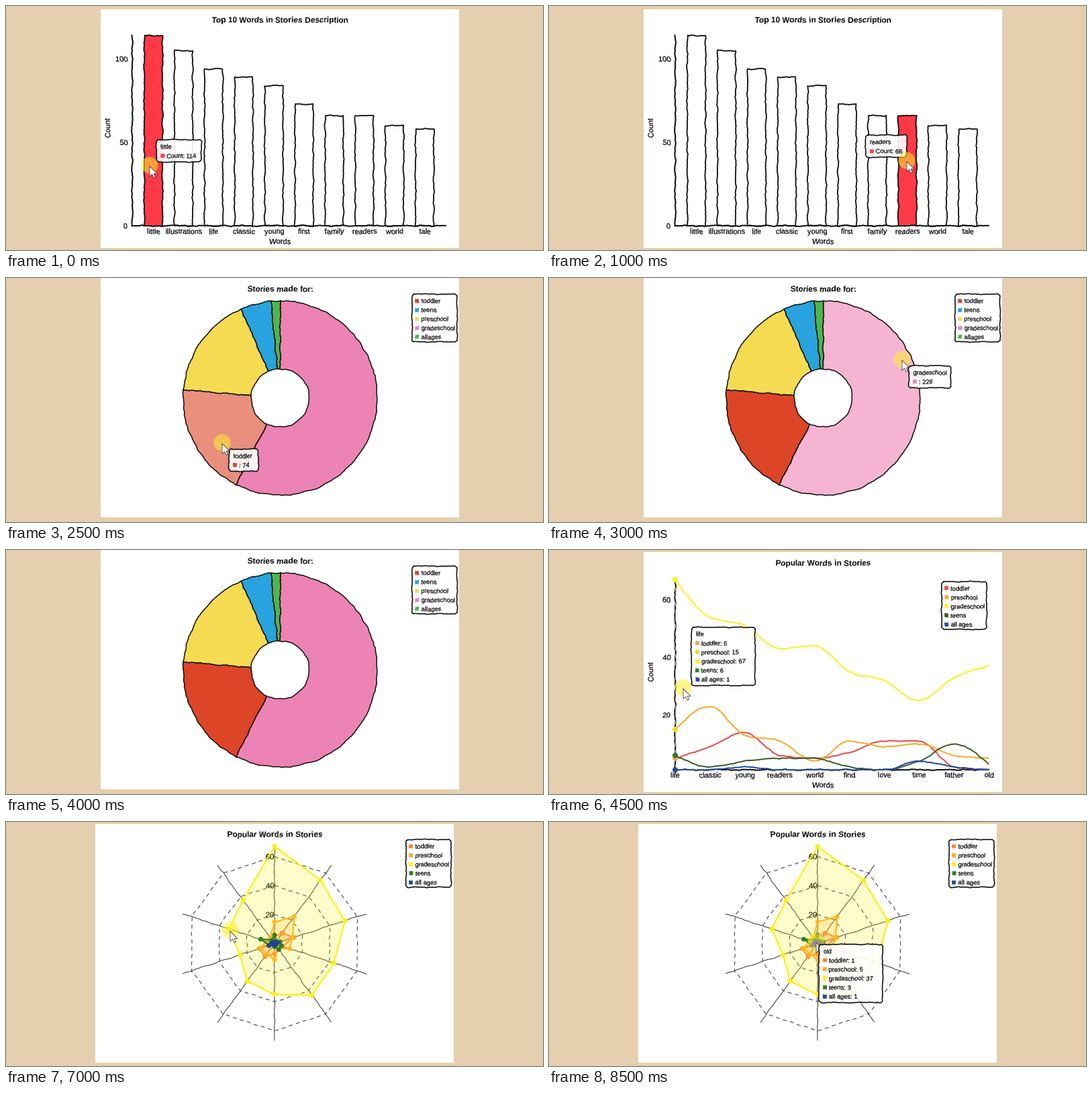
Recreate the animation shown at these times as a matplotlib script. Size 800x363 px, loop 9000 ms.

```python
import numpy as np
import matplotlib.pyplot as plt
from matplotlib.animation import FuncAnimation
from matplotlib.patches import PathPatch
from matplotlib.path import Path
from matplotlib.textpath import TextPath

W, H, DPI = 800, 363, 64
PX = 72 / DPI
INK = "#0c0c0c"
GRID = "#303030"
FONT = "Liberation Sans"

BAR_RED = "#ff3a46"
BARS = dict(little=114, illustrations=105, life=94, classic=89, young=84,
            first=73, family=66, readers=66, world=60, tale=58)

# slices run clockwise from the top
SLICES = [("gradeschool", 226, "#ed83b4"), ("toddler", 74, "#dc4526"),
          ("preschool", 67, "#f4db52"), ("teens", 20, "#29a3dd"),
          ("allages", 6, "#4cb64d")]

WORDS = "life classic young readers world find love time father old".split()
SERIES = {
    "toddler": [5, 9, 14, 6, 5, 7, 11, 11, 2, 1],
    "preschool": [15, 23, 13, 11, 4, 11, 9, 10, 6, 5],
    "gradeschool": [67, 54, 51, 43, 44, 35, 32, 25, 33, 37],
    "teens": [6, 2, 4, 5, 5, 2, 1, 4, 10, 3],
    "all ages": [1, 1, 2, 1, 1, 1, 1, 4, 2, 1],
}
LINE_COLORS = ["#ee4848", "#ffa726", "#fff01a", "#3c5a28", "#2149a8"]
DOT_COLORS = ["#dfab55", "#f2d81e", "#fff01a", "#2f7d22", "#2149a8"]
RADAR_COLORS = ["#ff7c38", "#ffaa22", "#fff000", "#2f7d22", "#1f4690"]

# step: (hovered index or None, pointer position)
HOVER = {
    0: (0, (214, 237)), 1: (3, (358, 232)), 2: (7, (533, 230)), 3: (9, (615, 235)),
    5: (1, (322, 245)), 6: (0, (526, 121)), 7: (3, (376, 70)),
    9: (0, (200, 205)), 10: (3, (336, 205)), 11: (5, (461, 203)), 12: (7, (553, 205)),
    14: (None, (334, 161)), 15: (8, (332, 159)), 16: (1, (428, 141)), 17: (9, (398, 178)),
}

fig = plt.figure(figsize=(W / DPI, H / DPI), dpi=DPI, facecolor="#e6cfae")
ax = fig.add_axes([0, 0, 1, 1])
ax.set_xlim(0, W)
ax.set_ylim(H, 0)
ax.axis("off")


def wave(u, v):
    """Uneven wobble along u that drifts slowly with v."""
    return (0.5 * np.sin(0.17 * u + 1.7 * np.sin(0.05 * v + 0.041 * u))
            + 0.35 * np.sin(0.41 * u + 0.2 * v + 2 * np.sin(0.09 * u))
            + 0.18 * np.sin(0.97 * u - 0.3 * v))


def warp(p, k=1.0):
    p = np.asarray(p, float)
    x, y = p.T
    return p + k * np.column_stack([wave(y, x), wave(x, y + 40)])


def resample(pts, step=1.5):
    pts = np.asarray(pts, float)
    out = [pts[:1]]
    for a, b in zip(pts[:-1], pts[1:]):
        n = max(1, int(np.hypot(*(b - a)) / step))
        out.append(a + (b - a) * np.linspace(0, 1, n + 1)[1:, None])
    return np.vstack(out)


def shape(verts, fill="none", edge="none", lw=0.0, codes=None, dash=None):
    style = (0, tuple(d / lw for d in dash)) if dash else "-"
    ax.add_patch(PathPatch(Path(verts, codes), facecolor=fill, edgecolor=edge,
                           linewidth=lw * PX, linestyle=style, joinstyle="round",
                           capstyle="butt" if dash else "round"))


def rough(pts, fill="none", edge=INK, lw=1.8, closed=False, dash=None, k=1.0):
    pts = list(pts)
    if closed:
        pts.append(pts[0])
    shape(warp(resample(pts), k), fill, edge, lw, dash=dash)


def disc(x, y, r, fill):
    a = np.linspace(0, 2 * np.pi, 40)
    shape(np.column_stack([x + r * np.cos(a), y + r * np.sin(a)]), fill)


def text(s, x, y, size=10.9, ha=0.5, bold=False, turn=False):
    prop = dict(family=FONT, weight="bold" if bold else "normal")
    path = TextPath((0, 0), s, size=size, prop=prop)
    vx, vy = path.vertices.T
    vx = vx - ha * vx.max()
    vy = 0.36 * size - vy
    if turn:
        vx, vy = vy, -vx
    verts = warp(np.column_stack([vx + x, vy + y]), 0.7)
    shape(verts, INK, INK, 0.05 if bold else 0.3, codes=path.codes)


def box(x, y, w, h, fill, r=2.5):
    x2, y2 = x + w, y + h
    rough([(x + r, y), (x2 - r, y), (x2, y + r), (x2, y2 - r), (x2 - r, y2),
           (x + r, y2), (x, y2 - r), (x, y + r)], fill, lw=1.6, closed=True, k=0.8)


def marker(x, y, color):
    r = 2.6
    rough([(x - r, y - r), (x + r, y - r), (x + r, y + r), (x - r, y + r)],
          color, color, 0.6, closed=True, k=0.6)


def legend(x, y, names, colors):
    box(x, y, 67, 71, "white")
    for i, (name, color) in enumerate(zip(names, colors)):
        marker(x + 7.2, y + 10 + 13.4 * i, color)
        text(name, x + 13.6, y + 10 + 13.4 * i, 9.3, ha=0)


def tip_width(title, items):
    longest = max(len(s) for s, _ in items)
    return 11 + max(4.7 * len(title), 5.6 * longest)


def tooltip(x, y, title, items):
    box(x, y, tip_width(title, items), 33 + 13.4 * (len(items) - 1), ("white", 0.9))
    text(title, x + 6.5, y + 10, 9.3, ha=0)
    for i, (s, color) in enumerate(items):
        marker(x + 9, y + 23.7 + 13.4 * i, color)
        text(s, x + 14.8, y + 23.7 + 13.4 * i, 9.3, ha=0)


def glow(x, y):
    disc(x, y, 12.5, ("#ffee30", 0.56))


def pointer(x, y):
    arrow = [(0, 0), (0, 15), (3.6, 11.8), (6.2, 17), (8.6, 16), (6.2, 11), (11, 11), (0, 0)]
    shape(np.array(arrow) + (x, y + 1.5), "white", "#4a4a4a", 0.9)


def page(x, y, h, title, title_y):
    shape([(x, y), (x + 534, y), (x + 534, y + h), (x, y + h), (x, y)], "white")
    text(title, x + 267, title_y, 11.9, bold=True)


def axes(ticks, to_y, label_y):
    rough([(188, 44), (188, 327)], lw=2)
    rough([(188, 327), (655, 327)], lw=2)
    for v in ticks:
        text(str(v), 181, to_y(v), ha=1)
    text("Count", 151, 182, turn=True)
    text("Words", 408, label_y)


def bar_chart(hover, pos):
    page(141, 5, 355, "Top 10 Words in Stories Description", 20.3)

    def to_y(v):
        return 327 - 2.482 * v

    axes((0, 50, 100), to_y, 350)
    for i, (word, count) in enumerate(BARS.items()):
        x, y = 219.6 + 44.9 * i, to_y(count)
        fill = BAR_RED if i == hover else "none"
        rough([(x - 13.6, 327), (x - 13.6, y), (x + 13.6, y), (x + 13.6, 327)], fill, closed=True)
        text(word, x, 335)
    if pos:
        x, y = pos
        word = list(BARS)[hover]
        items = [(f"Count: {BARS[word]}", BAR_RED)]
        left = x + 10 if x < 408 else x - tip_width(word, items)
        tooltip(left, y - 38, word, items)
        glow(x, y)
        pointer(x, y)


def pie_chart(hover, pos):
    page(141, 0, 356, "Stories made for:", 16)
    total = sum(s[1] for s in SLICES)
    start = 0.0
    for i, (_, count, color) in enumerate(SLICES):
        end = start + 2 * np.pi * count / total
        a = np.linspace(start, end, 90)
        ring = np.column_stack([np.sin(a), -np.cos(a)])
        pts = np.vstack([144.5 * ring, 43.2 * ring[::-1]]) + (408.5, 178.5)
        rough(pts, (color, 0.6) if i == hover else color, lw=1.5, closed=True)
        start = end
    by_name = {name: color for name, _, color in SLICES}
    order = ["toddler", "teens", "preschool", "gradeschool", "allages"]
    legend(605, 24, order, [by_name[n] for n in order])
    if pos:
        x, y = pos
        name, count, color = SLICES[hover]
        glow(x, y)
        pointer(x, y)
        tooltip(x + 10, y + 9.5, name, [(f": {count}", color)])


def smooth(x, y):
    """Monotone cubic through evenly spaced points."""
    h = x[1] - x[0]
    s = np.diff(y) / h
    a, b = s[:-1], s[1:]
    low = np.minimum(np.minimum(abs(a), abs(b)), abs(a + b) / 4)
    inner = (np.sign(a) + np.sign(b)) * low
    m = np.concatenate([[(3 * s[0] - inner[0]) / 2], inner, [(3 * s[-1] - inner[-1]) / 2]])
    t = np.linspace(0, 1, 24)
    out = []
    for i in range(len(s)):
        yy = (y[i] * (1 + 2 * t) * (1 - t) ** 2 + y[i + 1] * t * t * (3 - 2 * t)
              + h * m[i] * t * (1 - t) ** 2 + h * m[i + 1] * t * t * (t - 1))
        out.append(np.column_stack([x[i] + h * t, yy]))
    return np.vstack(out)


def word_items(i, colors):
    return [(f"{name}: {vals[i]}", c) for (name, vals), c in zip(SERIES.items(), colors)]


def line_chart(hover, pos):
    page(141, 3, 357, "Popular Words in Stories", 19)

    def to_y(v):
        return 327 - 4.288 * (np.asarray(v) - 1)

    axes((20, 40, 60), to_y, 349.5)
    xs = 188 + 51.9 * np.arange(len(WORDS))
    for x, word in zip(xs, WORDS):
        text(word, x, 334.5)
    for vals, color in zip(SERIES.values(), LINE_COLORS):
        rough(smooth(xs, to_y(vals)), edge=color, lw=2, k=0.8)
    legend(585, 47, SERIES, LINE_COLORS)
    if pos:
        x, y = pos
        shape([(xs[hover], 43.5), (xs[hover], 327)], edge="#a0a0a0", lw=1.3, dash=(6, 5))
        for vals, color in zip(SERIES.values(), DOT_COLORS):
            disc(xs[hover], to_y(vals[hover]), 4, color)
        items = word_items(hover, DOT_COLORS)
        left = x + 12 if x < 408 else x + 2 - tip_width("", items)
        tooltip(left, y - 90, WORDS[hover], items)
        glow(x, y)
        pointer(x, y)


def radar_chart(hover, pos):
    page(133, 3, 355, "Popular Words in Stories", 18)
    center = np.array([400, 181])
    a = np.arange(10) * np.pi / 5
    rays = np.column_stack([np.sin(a), -np.cos(a)])
    unit = 2.16
    for v in (20, 40, 60):
        rough(center + rays * v * unit, edge=GRID, lw=1, closed=True, dash=(6, 5), k=0.7)
    for ray in rays:
        rough([center, center + 144 * ray], edge=GRID, lw=1, k=0.8)
    for v in (20, 40, 60):
        text(str(v), 399, 181 - v * unit, 11.4, ha=1)
    for vals, color in zip(SERIES.values(), RADAR_COLORS):
        pts = center + rays * np.array(vals)[:, None] * unit
        rough(pts, (color, 0.2), color, 2.1, closed=True, k=0.4)
        for x, y in pts:
            disc(x, y, 3.5, color)
    legend(596, 26, SERIES, RADAR_COLORS)
    if pos:
        x, y = pos
        glow(x, y)
        if hover == 9:
            disc(x, y + 2, 6, "#96948a")
        pointer(x, y)
        if hover is not None:
            left = x + 4 if x < 400 else x - 102
            tooltip(left, y + 4, WORDS[hover], word_items(hover, RADAR_COLORS))


def draw(step):
    for p in list(ax.patches):
        p.remove()
    hover, pos = HOVER.get(step, (None, None))
    if step < 5:
        bar_chart(hover, pos)
    elif step < 9:
        pie_chart(hover, pos)
    elif step < 14:
        line_chart(hover, pos)
    else:
        radar_chart(hover, pos)
    return list(ax.patches)


anim = FuncAnimation(fig, draw, frames=18, interval=500, repeat=True,
                     repeat_delay=0, blit=False)
plt.show()
```
